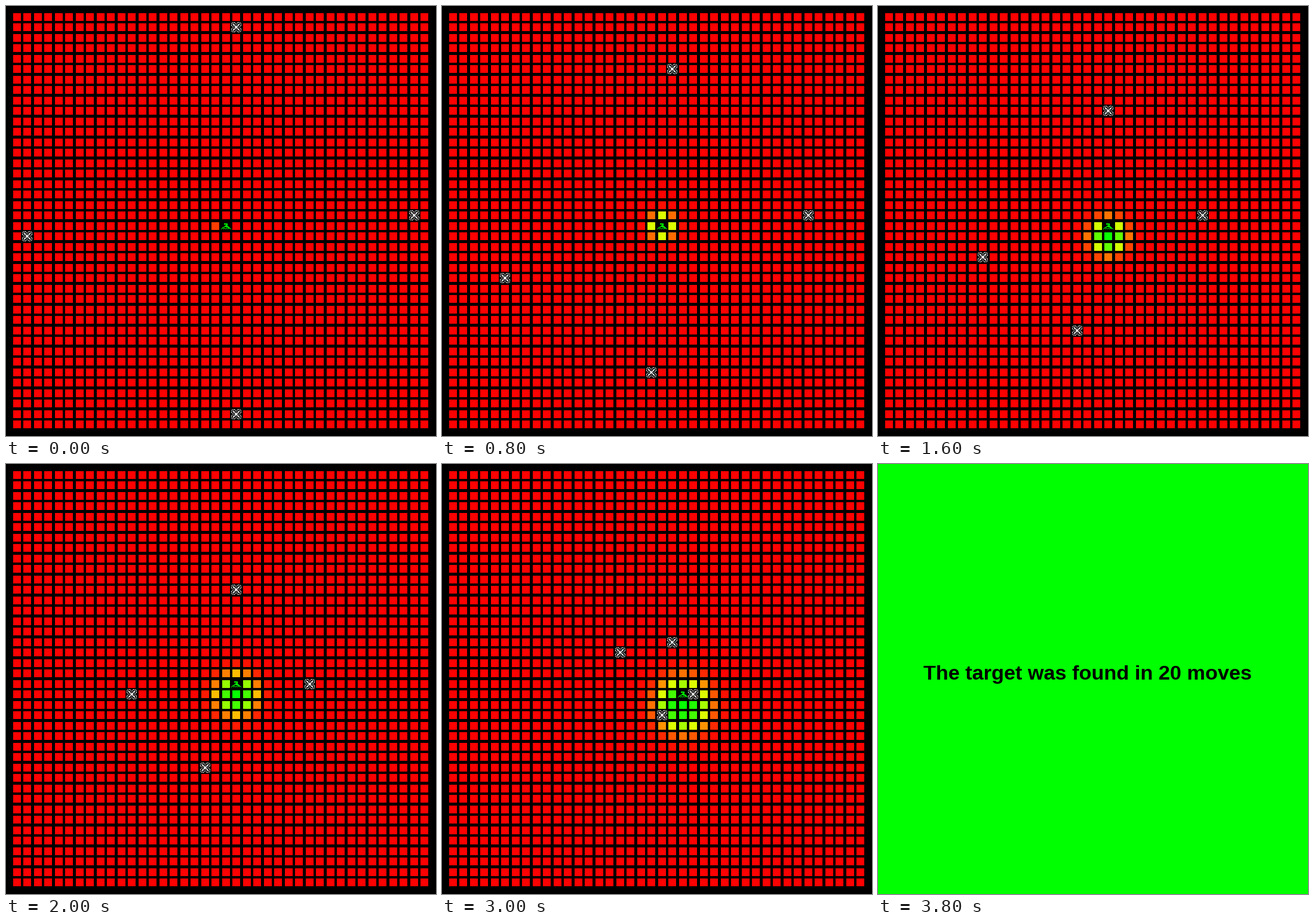
These frames come from a looping animation (720 px wide and 720 px high, 4000 ms). A matplotlib script:

```python
import numpy as np
import matplotlib.pyplot as plt
from matplotlib.animation import FuncAnimation

SIZE, CELLS, PITCH = 720, 40, 17.5
FRAMES, INTERVAL = 20, 200
WHITE, GREEN = (255, 255, 255), (0, 255, 0)

# Drone paths as (column, row) at the key moves
MOVES = [0, 4, 8, 12, 15, 18]
DRONES = [
    ([21, 21, 21, 21, 21, 21], [1, 5, 9, 13, 16, 19]),
    ([38, 34, 30, 26, 23, 22], [19, 19, 19, 21, 21, 22]),
    ([1, 5, 9, 13, 16, 19], [21, 25, 23, 19, 17, 20]),
    ([21, 19, 18, 19, 20, 21], [38, 34, 30, 26, 23, 21]),
]


def sprite(rows):
    return np.array([[c == "#" for c in row] for row in rows])


quarter = sprite([
    "..#.##...",
    ".#....#..",
    "#..#...#.",
    "..#.#....",
    "#..###.#.",
    "#...##...",
    ".#....##.",
    "..#.#.###",
    ".......##",
])
half = np.hstack([quarter, quarter[:, -2::-1]])
DRONE = np.vstack([half, half[-2::-1]])

SWIMMER = np.zeros((17, 17), bool)
SWIMMER[4:14] = sprite([
    ".....######......",
    ".....######......",
    ".........##......",
    ".......####......",
    ".......####......",
    ".....########....",
    "...###...#####...",
    "..##........###..",
    ".#.#.##.##.##.##.",
    "#...#..#..#..#..#",
])


def heat(n):
    """Likelihood of the swimmer per cell: a drifting, widening soft disc."""
    row, col = np.mgrid[:CELLS, :CELLS]
    if n == 0:
        return np.where((row == 20) & (col == 19), 0.12, 0.0)
    cx, cy = int(20 + 0.17 * n), int(20 + 0.155 * n)
    dist = np.hypot(col - cx, row - cy)
    return 1 / (1 + np.exp(7.6 / np.sqrt(n) * (dist - 0.6 - 0.118 * n)))


def stamp(img, icon, col, row, color):
    x, y = int(10 + PITCH * col), int(10 + PITCH * row)
    img[y:y + 17, x:x + 17] = icon[..., None] * np.array(color, np.uint8)


def board(n):
    img = np.zeros((SIZE, SIZE, 3), np.uint8)
    v = heat(n)
    colors = np.stack([510 * (1 - v), 510 * v, 0 * v], -1).clip(0, 255)
    start = (12 + PITCH * np.arange(CELLS)).astype(int)
    for r, y in enumerate(start):
        for c, x in enumerate(start):
            img[y:y + 13, x:x + 13] = colors[r, c]
    stamp(img, SWIMMER, 20 + (n > 6) + (n > 13), 20 + (n > 13) + (n > 16), GREEN)
    for cols, rows in DRONES:
        col, row = (round(np.interp(n, MOVES, p)) for p in (cols, rows))
        stamp(img, DRONE, col, row, WHITE)
    return img


fig = plt.figure(figsize=(10, 10), dpi=72)
ax = fig.add_axes([0, 0, 1, 1])
ax.axis("off")
view = ax.imshow(np.zeros((SIZE, SIZE, 3), np.uint8), interpolation="nearest",
                 extent=(0, SIZE, SIZE, 0))
label = ax.text(350.5, 360.5, f"The target was found in {FRAMES} moves",
                family="Liberation Sans", weight="bold", size=34.3,
                ha="center", va="baseline", color="black")


def update(n):
    done = n == FRAMES - 1
    label.set_visible(done)
    view.set_data(np.full((SIZE, SIZE, 3), GREEN, np.uint8) if done else board(n))
    return view, label


anim = FuncAnimation(fig, update, frames=FRAMES, interval=INTERVAL,
                     repeat=True, repeat_delay=0)
plt.show()
```
